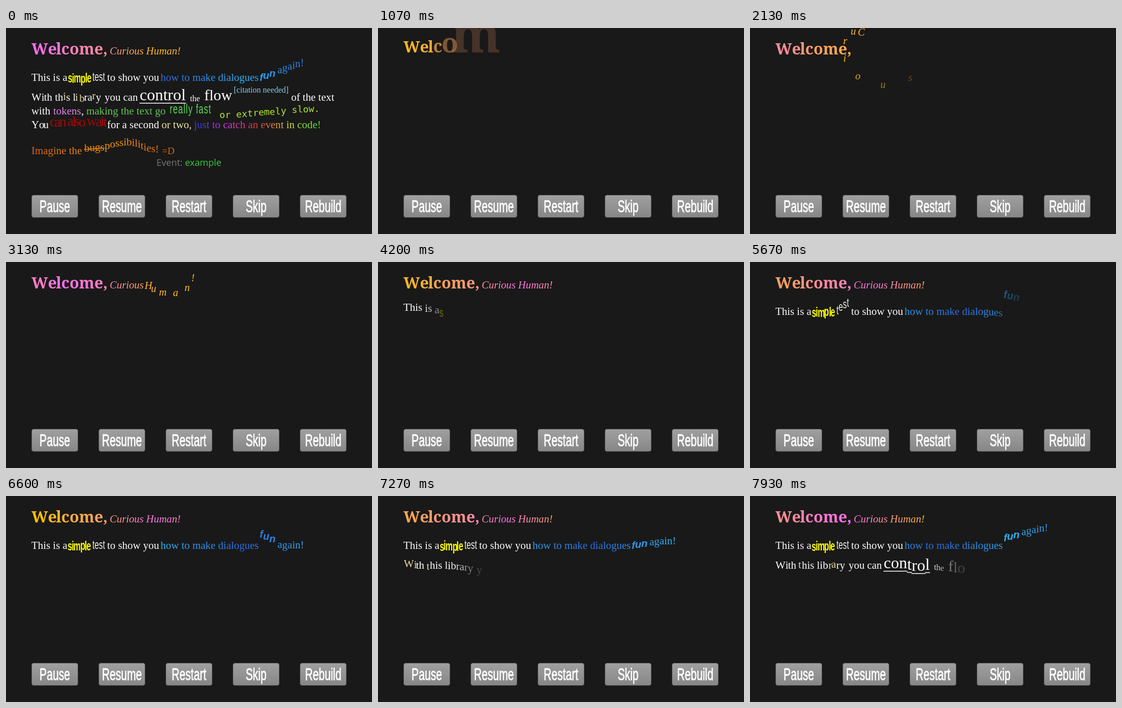
Recreate the animation shown at these times as an HTML page with a canvas. Size 720 px wide and 405 px high, loop 8000 ms.

```html
<!DOCTYPE html>
<html lang="en">
<head>
<meta charset="utf-8">
<title>Typing label</title>
<style>
  html, body { margin: 0; width: 100%; height: 100%; overflow: hidden; background: #191919; }
  canvas { display: block; width: 100vw; height: 100vh; }
</style>
</head>
<body>
<canvas id="stage"></canvas>
<script>
const LOOP = 8000, CLEAR = 530, FPS = 0.015, CONDENSED = 0.64;
const canvas = document.getElementById('stage');
const ratio = window.devicePixelRatio || 1;
canvas.width = 720 * ratio;
canvas.height = 405 * ratio;
const ctx = canvas.getContext('2d');

const SERIF = '"Liberation Serif", serif', SANS = '"Liberation Sans", sans-serif';
const body = `20.9px ${SERIF}`;
const clamp = v => Math.max(0, Math.min(1, v));
const frac = v => v - Math.floor(v);
const hash = (a, b) => frac(Math.sin(a * 127.1 + b * 311.7) * 43758.5453);
const tick = t => Math.floor(t * FPS + 0.1);

// Colours depend on the clock and the letter's place in the coloured phrase
const mix = (a, b, k) => `rgb(${a.map((v, i) => Math.round(v + (b[i] - v) * k))})`;
const pingPong = q => 1 - Math.abs(1 - 2 * frac(q));
const gradient = (a, b) => (t, n) => mix(a, b, pingPong((t - 6600) / 785 - n / 34));
const candy = gradient([255, 192, 10], [255, 110, 240]);
const ocean = gradient([42, 180, 245], [45, 105, 225]);
const ember = gradient([255, 152, 10], [215, 100, 15]);
const rainbow = (t, n) => `hsl(${235 + n * 8 + (t - 7000) * 0.3}, 72%, 54%)`;

// Entrances: change the pose from a glyph's age
const ease = (p, age) => { p.y += 10 * clamp(1 - age / 300) ** 2; };
const shrink = (p, age) => { p.scale = 1 + 2.6 * clamp(1 - age / 200) ** 2.5; };
const spiral = (p, age) => {
  const r = 75 * clamp(1 - age / 950), a = (20 + 0.56 * age) * Math.PI / 180;
  p.x += r * Math.cos(a);
  p.y += r * Math.sin(a);
};
const hang = (p, age) => {
  const rise = 1 - clamp(1 - age / 300) ** 2, drop = clamp((age - 1145) / 140);
  p.y -= 18 * rise * (1 - drop * drop);
};
const dip = (p, age) => {
  ease(p, age);
  p.y += 5 * Math.sin(Math.PI * clamp((age - 230) / 140));
};
const appear = () => {};

// Lasting effects: change the pose from the clock and the glyph's index
function bounceOut(a) {
  const widths = [0.68, 0.34, 0.2, 0.15], heights = [1, 0.26, 0.11, 0.03];
  a += 0.34;
  let i = 0;
  while (i < 3 && a > widths[i]) a -= widths[i++];
  a = clamp(a / widths[i]);
  return 1 - 4 * heights[i] * a * (1 - a);
}
const jump = (p, t, n) => {
  const k = frac((t - 6600) / 1000 + 0.075 - 0.0172 * (n - 22));
  p.y -= 36 * (k < 0.2 ? 1 - (1 - k / 0.2) ** 2 : 1 - bounceOut((k - 0.2) / 0.8));
};
const shake = size => (p, t, n) => {
  p.x += (hash(n, tick(t)) - 0.5) * size;
  p.y += (hash(n + 40, tick(t)) - 0.5) * size;
};
const jolt = (p, t, n) => {
  const beat = Math.floor(t / 130);
  if (hash(n, beat) > 0.13) return;
  p.x += (hash(n + 9, beat) - 0.5) * 3;
  p.y += (hash(n + 5, beat) - 0.5) * 6;
  p.color = '#e8d6a0';
};
const wave = (p, t, n) => {
  p.y -= 10 + 7.5 * Math.sin(2 * Math.PI * (frac((t - 7000) / 1000) - (n - 26) / 18));
};
const drift = (p, t, n) => {
  p.y -= 6.5 * Math.sin((n - 8.5) / 6.5 + (t - 7000) / 700);
};

const glyphs = [];

// Lays out the runs of one line; typing goes on from run to run
function line(start, step, y, runs, raise = () => 0) {
  let count = 0;
  for (const run of runs) {
    const { s, x, first = 0, font = body, color = '#fff', dy = 0, squeeze = 1, tracking = 0,
      intro = ease, fx, rule } = run;
    ctx.font = font;
    [...s].forEach((char, i) => {
      const at = start + step * count++;
      if (char === ' ') return;
      const left = ctx.measureText(s.slice(0, i)).width * squeeze + i * tracking;
      glyphs.push({ char, n: first + i, at, x: x + left, y: y + dy, font, color, squeeze, intro, fx,
        rule, raise, width: ctx.measureText(char).width });
    });
  }
}

const narrow = (size, weight = '') => ({ font: `${weight} ${size}px ${SANS}`, squeeze: CONDENSED });

line(720, 67, 52, [
  { s: 'Welcome,', x: 50, font: 'bold 30.5px "Noto Serif", serif', color: candy, intro: shrink }
], t => t < 1665 ? -4 : 0);
line(1665, 70, 52, [
  { s: 'Curious Human!', x: 204, first: 8, font: `italic 20.7px ${SERIF}`, color: candy, intro: spiral }
]);
line(3865, 30.6, 104, [
  { s: 'This is a ', x: 50 },
  { s: 'simple ', x: 121, ...narrow(25, 'bold'), tracking: -0.8, color: '#ff0', dy: 3, fx: shake(1.5) },
  { s: 'test ', x: 170, ...narrow(24), color: '#eee', intro: hang },
  { s: 'to show you ', x: 199 },
  { s: 'how to make dialogues ', x: 304, color: ocean },
  { s: 'fun ', x: 499, first: 22, font: `italic bold 20px ${SANS}`, color: ocean, intro: appear, fx: jump },
  { s: 'again!', x: 534, first: 26, color: ocean, intro: appear, fx: jump }
], t => t < 4260 ? -8 : 0);
line(6700, 30.6, 143, [
  { s: 'With this library ', x: 50, fx: jolt },
  { s: 'you can ', x: 194 },
  { s: 'control ', x: 263, font: `32px ${SERIF}`, dy: -1, intro: dip, rule: 5 },
  { s: 'the ', x: 362, font: `16px ${SERIF}`, dy: 1 },
  { s: 'flow ', x: 390, font: `30px ${SERIF}`, dy: -1 },
  { s: '[citation needed] ', x: 448, font: `16px ${SERIF}`, color: '#87ceeb', dy: -16 },
  { s: 'of the text', x: 561 }
]);
line(9000, 30, 170, [
  { s: 'with ', x: 50 },
  { s: 'tokens', x: 93, color: '#e884ea' },
  { s: ', ', x: 148 },
  { s: 'making the text go ', x: 158, color: '#62c554' },
  { s: 'really fast ', x: 322, ...narrow(26), tracking: 1, color: '#55dc50', dy: -2 },
  { s: 'or extremely slow.', x: 420, font: '18.2px "DejaVu Sans Mono", monospace', color: '#aee62b', dy: 1, fx: drift }
]);
line(9000, 30, 197, [
  { s: 'You ', x: 50 },
  { s: 'can also wait ', x: 85, font: `28px ${SERIF}`, tracking: -2.7, color: '#a30808', dy: -4, fx: shake(2) },
  { s: 'for a second ', x: 199 },
  { s: 'or two, ', x: 306, color: '#f0e6a0' },
  { s: 'just to catch an event in code!', x: 370, color: rainbow }
]);
line(9000, 30, 248, [
  { s: 'Imagine the ', x: 50, color: ember },
  { s: 'bugs', x: 154, first: 12, color: ember, dy: -2, rule: -5, fx: drift },
  { s: 'possibilities!', x: 194, first: 17, color: ember, fx: wave },
  { s: '=D', x: 307, first: 32, font: `19px ${SERIF}`, color: ember }
]);

function drawGlyph(g, t, full) {
  const age = full ? 1e5 : t - g.at;
  if (age < 0) return;
  const p = { x: g.x, y: g.y + (full ? 0 : g.raise(t)), scale: 1,
    color: typeof g.color === 'function' ? g.color(t, g.n) : g.color };
  g.intro(p, age);
  if (g.fx) g.fx(p, t, g.n);
  ctx.save();
  ctx.globalAlpha = clamp(0.15 + age / 260);
  ctx.translate(p.x, p.y);
  ctx.scale(p.scale * g.squeeze, p.scale);
  ctx.font = g.font;
  ctx.fillStyle = p.color;
  ctx.fillText(g.char, 0, 0);
  if (g.rule !== undefined) ctx.fillRect(-0.5, g.rule, g.width + 1, 1.5);
  ctx.restore();
}

function drawButton(label, i, pressed) {
  const x = 50.5 + 132 * i, shade = ctx.createLinearGradient(0, 328, 0, 373);
  shade.addColorStop(0, pressed ? '#707070' : '#a0a0a0');
  shade.addColorStop(1, pressed ? '#5c5c5c' : '#868686');
  ctx.beginPath();
  ctx.roundRect(x, 328.5, 91, 44, 4);
  ctx.fillStyle = shade;
  ctx.fill();
  ctx.strokeStyle = '#4a4a4a';
  ctx.lineWidth = 1;
  ctx.stroke();
  ctx.save();
  ctx.translate(x + 45.5, 362);
  ctx.scale(CONDENSED, 1);
  ctx.font = `33px ${SANS}`;
  ctx.textAlign = 'center';
  ctx.fillStyle = ctx.strokeStyle = '#fff';
  ctx.lineWidth = 0.8;
  ctx.fillText(label, 0, 0);
  ctx.strokeText(label, 0, 0);
  ctx.restore();
}

function drawEvent() {
  ctx.font = '18px "Open Sans", sans-serif';
  ctx.fillStyle = '#777';
  ctx.fillText('Event:', 296, 270.5);
  ctx.fillStyle = '#32cd32';
  ctx.fillText('example', 352, 270.5);
}

function render(now) {
  const time = tick(now % LOOP) / FPS % LOOP;
  const full = time < CLEAR;
  ctx.setTransform(ratio, 0, 0, ratio, 0, 0);
  ctx.fillStyle = '#191919';
  ctx.fillRect(0, 0, 720, 405);
  // The finished text keeps its effects running until it is rebuilt
  const clock = full ? time + 7000 : time;
  for (const g of glyphs) drawGlyph(g, clock, full);
  if (full) drawEvent();
  ['Pause', 'Resume', 'Restart', 'Skip', 'Rebuild'].forEach((label, i) =>
    drawButton(label, i, i === 4 && time >= 390 && full));
}

const start = performance.now();
function frame() {
  render(performance.now() - start);
  requestAnimationFrame(frame);
}
frame();
</script>
</body>
</html>
```
